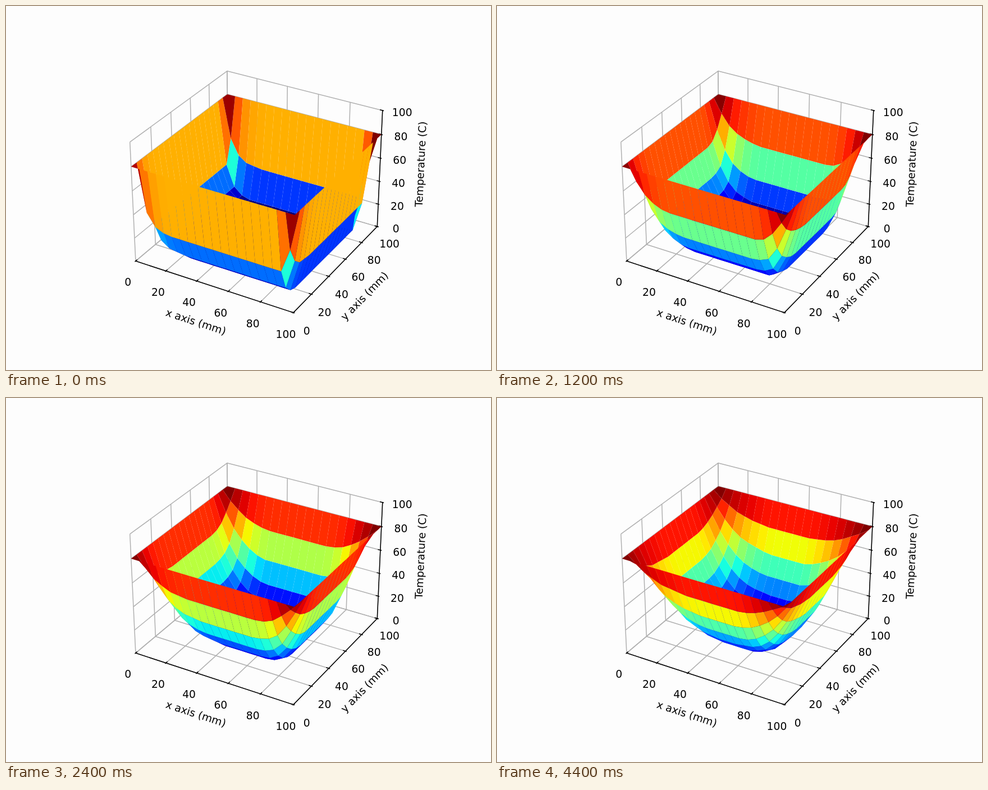
Write an HTML page with a canvas that moves like this. It is 864x648 px and loops after 4.8 s.

```html
<!DOCTYPE html>
<html lang="en">
<head>
<meta charset="utf-8">
<title>Plate temperature</title>
<style>
  html, body { margin: 0; width: 100%; height: 100%; overflow: hidden; background: #fdfdfd; }
  svg, canvas { position: absolute; left: 0; top: 0; width: 864px; height: 648px; }
  text { font: 18.75px "DejaVu Sans", sans-serif; text-anchor: middle; }
  path { fill: none; stroke-width: 1.5; }
  .grid { stroke: #b0b0b0; stroke-linejoin: round; }
  .axis { stroke: #000; stroke-linecap: square; }
  .tick { stroke: #000; }
</style>
</head>
<body>
<svg id="axes" viewBox="0 0 864 648"></svg>
<canvas id="surface" width="864" height="648"></canvas>
<script>
const N = 20, STEPS = 12, STEP_MS = 400, EDGE = 80;
const svg = document.getElementById('axes');
const ctx = document.getElementById('surface').getContext('2d');

// Perspective camera: elevation 30°, azimuth -60°, distance 10
const ELEV = Math.PI / 6, AZIM = -Math.PI / 3, DIST = 10, SCALE = 2704.5;
const se = Math.sin(ELEV), ce = Math.cos(ELEV), sa = Math.sin(AZIM), ca = Math.cos(AZIM);

function project([x, y, z]) {
  const a = (x / 100 - 0.5) * 1.190476;
  const b = (y / 100 - 0.5) * 1.190476;
  const c = (z / 100 - 0.5) * 0.892857;
  const near = 1 / (DIST - (ce * ca * a + ce * sa * b + se * c));
  return {
    x: 450.1 + SCALE * near * (ca * b - sa * a),
    y: 320.5 - SCALE * near * (ce * c - se * ca * a - se * sa * b),
    near
  };
}

function add(tag, attrs, content = '') {
  const el = document.createElementNS('http://www.w3.org/2000/svg', tag);
  for (const key in attrs) el.setAttribute(key, attrs[key]);
  el.textContent = content;
  svg.append(el);
}

function line(cls, ...points) {
  const d = points.map(project).map(p => p.x.toFixed(2) + ' ' + p.y.toFixed(2)).join('L');
  add('path', { class: cls, d: 'M' + d });
}

function tickLabel(value, point) {
  const p = project(point);
  add('text', { x: p.x, y: p.y + 14.8 }, value);
}

// Axis title, parallel to the edge that runs from one corner to another
function title(content, point, from, to) {
  const p = project(point), a = project(from), b = project(to);
  const angle = Math.atan2(b.y - a.y, b.x - a.x) * 180 / Math.PI;
  add('text', { transform: `translate(${p.x} ${p.y}) rotate(${angle})`, y: 5.2 }, content);
}

function drawAxes() {
  const ticks = [0, 20, 40, 60, 80, 100];
  const IN = 1.6, OUT = 0.8, PAD = 8.1, FAR = 17.6;
  const o = [0, 0, 0], px = [100, 0, 0], pxy = [100, 100, 0], top = [100, 100, 100];

  for (const v of ticks) {
    line('grid', [v, 0, 0], [v, 100, 0], [v, 100, 100]);
    line('grid', [100, v, 0], [0, v, 0], [0, v, 100]);
    line('grid', [0, 0, v], [0, 100, v], [100, 100, v]);
  }
  line('axis', o, px);
  line('axis', px, pxy);
  line('axis', pxy, top);
  for (const v of ticks) {
    line('tick', [v, -OUT, 0], [v, IN, 0]);
    line('tick', [100 + OUT, v, 0], [100 - IN, v, 0]);
    line('tick', [100 + OUT, 100, v], [100 - IN, 100, v]);
    tickLabel(v, [v, -PAD, -PAD]);
    tickLabel(v, [100 + PAD, v, -PAD]);
    tickLabel(v, [100 + PAD, 100 + PAD, v]);
  }
  title('x axis (mm)', [50, -FAR, -FAR], o, px);
  title('y axis (mm)', [100 + FAR, 50, -FAR], px, pxy);
  title('Temperature (C)', [100 + FAR, 100 + FAR, 50], pxy, top);
}

// Piecewise linear jet colour map
const RED = [[0, 0], [.35, 0], [.66, 1], [.89, 1], [1, .5]];
const GREEN = [[0, 0], [.125, 0], [.375, 1], [.64, 1], [.91, 0], [1, 0]];
const BLUE = [[0, .5], [.11, 1], [.34, 1], [.65, 0], [1, 0]];

function ramp(stops, t) {
  const k = Math.max(1, stops.findIndex(s => t <= s[0]));
  const [x0, y0] = stops[k - 1], [x1, y1] = stops[k];
  return Math.round(255 * (y0 + (y1 - y0) * (t - x0) / (x1 - x0)));
}

const jet = t => `rgb(${[RED, GREEN, BLUE].map(c => ramp(c, t))})`;

// One in-place relaxation sweep, kept in whole degrees
function relax(T) {
  for (let i = 1; i < N - 1; i++)
    for (let j = 1; j < N - 1; j++)
      T[i][j] = Math.floor((T[i - 1][j] + T[i + 1][j] + T[i][j - 1] + T[i][j + 1]) / 4);
}

function facets(T) {
  const at = (i, j) => project([i * 100 / (N - 1), j * 100 / (N - 1), T[i][j]]);
  const list = [];
  for (let i = 0; i < N - 1; i++)
    for (let j = 0; j < N - 1; j++) {
      const pts = [at(i, j), at(i + 1, j), at(i + 1, j + 1), at(i, j + 1)];
      list.push({
        pts,
        heat: (T[i][j] + T[i + 1][j] + T[i + 1][j + 1] + T[i][j + 1]) / 4,
        near: pts.reduce((sum, p) => sum + p.near, 0)
      });
    }
  const heats = list.map(f => f.heat);
  const min = Math.min(...heats), max = Math.max(...heats);
  for (const f of list) f.color = jet((f.heat - min) / (max - min));
  return list.sort((a, b) => a.near - b.near);
}

function simulate() {
  const rim = k => k === 0 || k === N - 1;
  const T = Array.from({ length: N }, (_, i) =>
    Array.from({ length: N }, (_, j) => rim(i) || rim(j) ? EDGE : 0));
  return Array.from({ length: STEPS }, () => {
    relax(T);
    return facets(T);
  });
}

function drawSurface(list) {
  ctx.clearRect(0, 0, 864, 648);
  for (const { pts, color } of list) {
    ctx.fillStyle = color;
    ctx.beginPath();
    for (const p of pts) ctx.lineTo(p.x, p.y);
    ctx.fill();
  }
}

drawAxes();
const states = simulate();
const start = performance.now();
let shown = -1;

function tick() {
  const step = Math.floor((performance.now() - start) / STEP_MS) % STEPS;
  if (step !== shown) drawSurface(states[shown = step]);
  requestAnimationFrame(tick);
}
tick();
</script>
</body>
</html>
```
